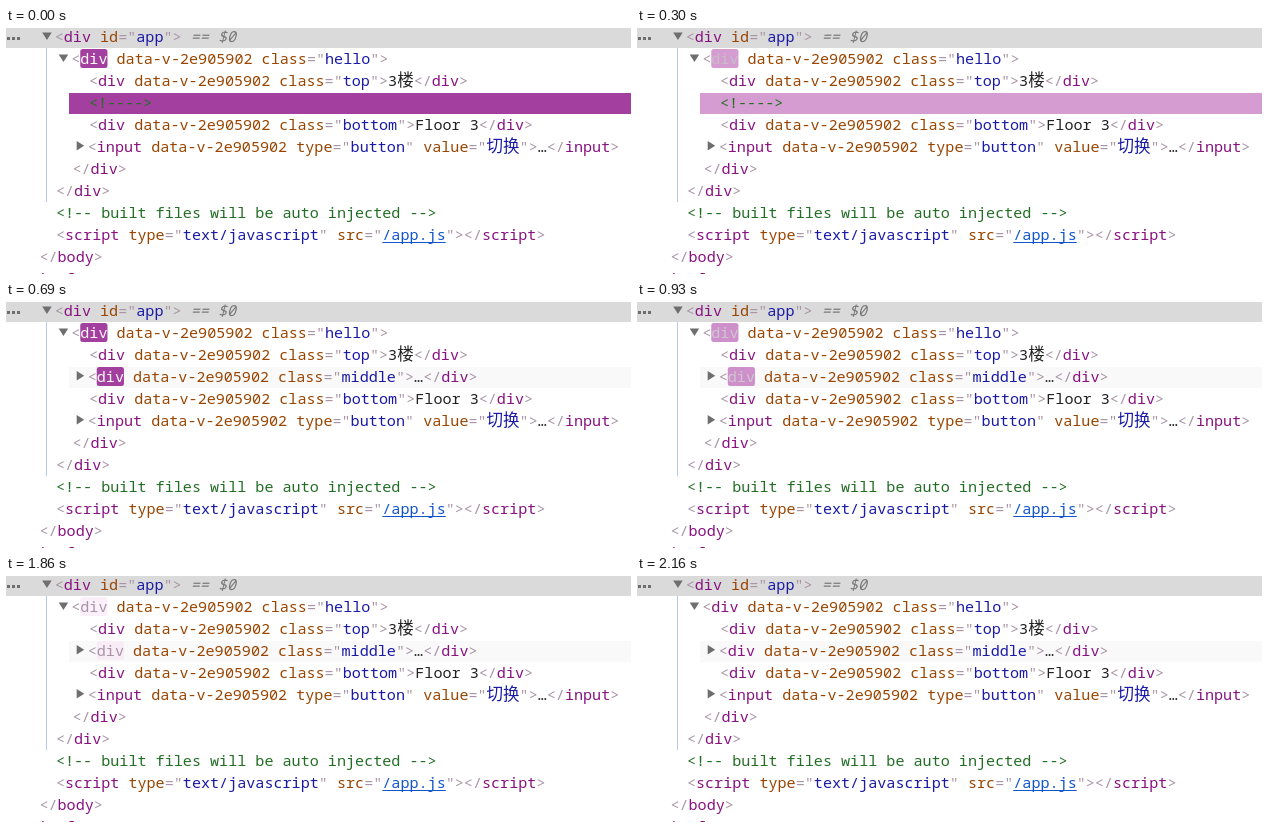
Recreate the animation shown at these times as an HTML page with a canvas. Size 625 by 246 pixels, loop 3360 ms.

```html
<!DOCTYPE html>
<html lang="zh-CN">
<head>
<meta charset="utf-8">
<title>Element tree updates</title>
<style>
  html, body { margin: 0; width: 100%; height: 100%; overflow: hidden; background: #fff; }
  canvas { display: block; width: 625px; height: 246px; }
</style>
</head>
<body>
<canvas id="stage"></canvas>
<script>
const W = 625, H = 246, LOOP = 3360, ROW = 22, INDENT = 16.5;
const MONO = '15.12px "Noto Sans Mono", monospace';
const HAN = '300 16.5px "Noto Sans CJK SC", "Noto Sans CJK", sans-serif';
const MARK = '#a894a6', TAG = '#881280', ATTR = '#994500', VALUE = '#1a1aa6';
const LINK = '#1155cc', NOTE = '#236e25', TEXT = '#222', ARROW = '#6e6e6e', HINT = '#777';

const SWAP = 630;                       // the comment becomes an element
const FLASH = { first: -15, second: 675, length: 1400 };
const STEPS = [0, 30, 90, 150, 210, 300, 390, 450, 510,
  630, 690, 750, 810, 870, 930, 990, 1080, 1230, 1470,
  1800, 1860, 1920, 1980, 2040, 2100, 2130, 2160];

const canvas = document.getElementById('stage');
const ctx = canvas.getContext('2d');
const dpr = window.devicePixelRatio || 1;
canvas.width = W * dpr;
canvas.height = H * dpr;

const rowTop = n => ROW * n - 2;
const indent = depth => 15.7 + INDENT * depth;
const mix = (a, b, k) => a.map((v, i) => v + (b[i] - v) * k);
const rgba = (c, alpha = 1) => `rgba(${c.map(Math.round).join()},${alpha})`;

// cubic-bezier(0, 0, 0.2, 1)
function ease(x) {
  let lo = 0, hi = 1;
  for (let i = 0; i < 24; i++) {
    const s = (lo + hi) / 2;
    if (0.6 * s * s + 0.4 * s ** 3 < x) lo = s; else hi = s;
  }
  return 3 * lo * lo - 2 * lo ** 3;
}

function flashAt(t) {
  const start = t < SWAP ? FLASH.first : FLASH.second;
  const p = Math.max(0, (t - start) / FLASH.length);
  if (p >= 1) return null;
  const k = ease(Math.min(1, p / 0.8));
  const alpha = p > 0.8 ? 1 - ease((p - 0.8) / 0.2) : 1;
  return {
    back: rgba(mix([158, 54, 153], [245, 219, 244], k), alpha),
    ink: rgba(mix([255, 255, 255], [168, 148, 166], k))
  };
}

// Markup is a list of [text, colour, style] parts; a null value is a bare attribute.
const attribute = ([name, value]) => {
  if (value === null) return [[' ' + name, ATTR]];
  const link = name === 'src';
  return [[' ' + name, ATTR], ['="', MARK],
    [value, link ? LINK : VALUE, link ? 'link' : ''], ['"', MARK]];
};
const open = (tag, attrs = {}) => [
  ['<', MARK], [tag, TAG], ...Object.entries(attrs).flatMap(attribute), ['>', MARK]
];
const close = tag => [['</', MARK], [tag, TAG], ['>', MARK]];
const element = (tag, attrs, text) => [...open(tag, attrs), [text, TEXT], ...close(tag)];
const scoped = attrs => ({ 'data-v-2e905902': null, ...attrs });

const comment = [['<!---->', NOTE]];
const middle = element('div', scoped({ class: 'middle' }), '…');
const rows = swapped => [
  [2, [...open('div', { id: 'app' }), [' == $0', HINT, 'italic']], 'down'],
  [3, open('div', scoped({ class: 'hello' })), 'down'],
  [4, element('div', scoped({ class: 'top' }), '3楼')],
  swapped ? [4, middle, 'right'] : [4, comment],
  [4, element('div', scoped({ class: 'bottom' }), 'Floor 3')],
  [4, element('input', scoped({ type: 'button', value: '切换' }), '…'), 'right'],
  [3, close('div')],
  [2, close('div')],
  [2, [['<!-- built files will be auto injected -->', NOTE]]],
  [2, element('script', { type: 'text/javascript', src: '/app.js' }, '')],
  [1, close('body')],
  [0, close('html')]
];
const before = rows(false), after = rows(true);

function box(x, y, w, h, color) {
  ctx.fillStyle = color;
  ctx.fillRect(x, y, w, h);
}

function badge(x, y, w, color) {
  ctx.fillStyle = color;
  ctx.beginPath();
  ctx.roundRect(x, y, w, 19, 2.5);
  ctx.fill();
}

function arrow(x, y, kind) {
  const points = kind === 'down'
    ? [[-12.5, -9.5], [-3, -9.5], [-7.75, -2]]
    : [[-11, -11], [-3.5, -6.25], [-11, -1.5]];
  ctx.fillStyle = ARROW;
  ctx.beginPath();
  points.forEach(([dx, dy]) => ctx.lineTo(x + dx, y + dy));
  ctx.fill();
}

function run(text, x, y, color, style) {
  for (const piece of text.match(/[\u4e00-\u9fff]+|[^\u4e00-\u9fff]+/g) || []) {
    const han = /[\u4e00-\u9fff]/.test(piece);
    ctx.font = han ? HAN : (style === 'italic' ? 'italic ' : '') + MONO;
    ctx.fillStyle = color;
    ctx.fillText(piece, x, y);
    const w = ctx.measureText(piece).width;
    if (style === 'link') box(x, y + 2, w, 1, color);
    x += w;
  }
  return x;
}

function line(n, [depth, parts, kind], flash) {
  const y = rowTop(n) + 16;
  let x = indent(depth);
  if (kind) arrow(x, y, kind);
  else x += 1.2;
  parts.forEach(([text, color, style], i) => {
    const lit = flash && i === 1;
    if (lit) {
      ctx.font = MONO;
      badge(x, rowTop(n) + 1, ctx.measureText(text).width, flash.back);
    }
    x = run(text, x, y, lit ? flash.ink : color, style);
  });
}

function hoverRow(t) {
  if (t < 2100 || t >= 2160) return 0;
  return t < 2130 ? 6 : 5;
}

function draw(t) {
  const flash = flashAt(t), swapped = t >= SWAP, hover = hoverRow(t);
  ctx.setTransform(dpr, 0, 0, dpr, 0, 0);
  box(0, 0, W, H, '#fff');
  box(0, 0, W, 20, '#dadada');
  if (swapped) box(63, 65, W - 63, 21, '#faf9fa');
  else if (flash) box(63, 65, W - 63, 21, flash.back);
  if (hover) box(2, rowTop(hover) + 1, W - 2, 21, '#ebf1fb');
  box(40, 20, 1, 154, '#b4c9ee');

  for (let i = 0; i < 3; i++) box(1 + i * 5, 9, 3, 3, ARROW);
  (swapped ? after : before).forEach((row, n) =>
    line(n, row, n === 1 || (n === 3 && swapped) ? flash : null));
}

const began = performance.now();
function tick() {
  const t = (performance.now() - began) % LOOP;
  draw(STEPS.filter(s => s <= t).pop() || 0);
  requestAnimationFrame(tick);
}
tick();
</script>
</body>
</html>
```
